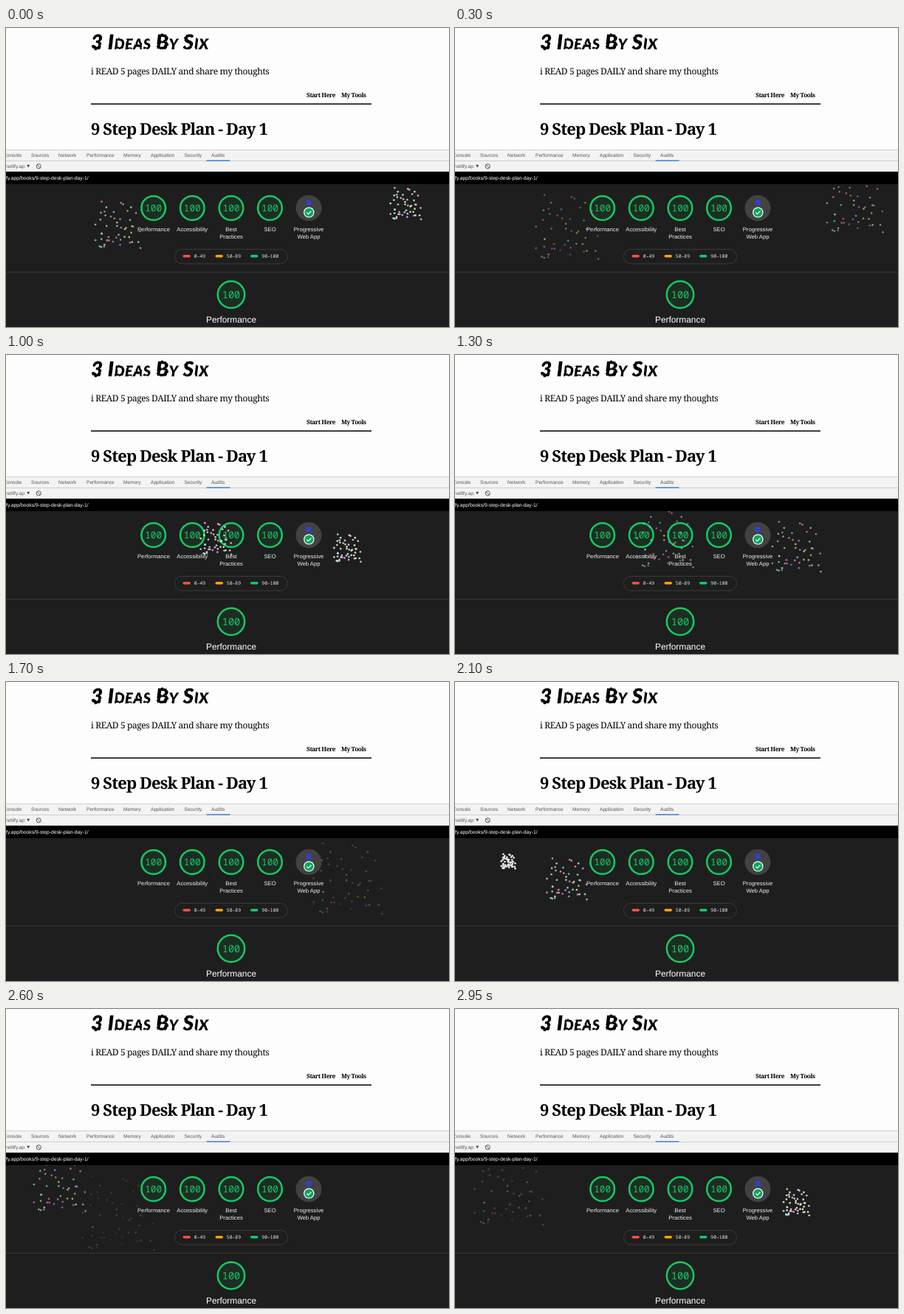
Write an HTML page with a canvas that moves like this. It is 600 by 406 pixels and loops after 3000 ms.

```html
<!DOCTYPE html>
<html lang="en">
<head>
<meta charset="utf-8">
<title>Audit fireworks</title>
<style>
  html, body { margin: 0; width: 600px; height: 406px; overflow: hidden; background: #fdfdfd; }
  svg, canvas { position: absolute; left: 0; top: 0; display: block; }
  canvas { top: 212px; }
  text { text-rendering: geometricPrecision; }
  .ui { font-family: "Liberation Sans", Arial, sans-serif; }
  .slab { font-family: "Noto Serif", serif; fill: #000; }
  .mono { font-family: "Noto Sans Mono", monospace; }
  .marker { font: italic 900 28px Lato, sans-serif; font-variant-caps: small-caps; letter-spacing: .4px; }
  .tab { font-size: 6.6px; fill: #555; }
  .label { font-size: 7.7px; fill: #f0f0f0; text-anchor: middle; }
  .score { fill: #17c964; text-anchor: middle; }
  .ring { fill: #1d2d24; stroke: #17c964; }
  .legend { font-size: 6.4px; fill: #e6e6e6; }
</style>
</head>
<body>
<svg id="page" width="600" height="406" viewBox="0 0 600 406">
  <defs>
    <filter id="rough" x="-5%" y="-20%" width="110%" height="140%">
      <feTurbulence type="fractalNoise" baseFrequency=".12" numOctaves="2" seed="4"/>
      <feDisplacementMap in="SourceGraphic" scale="2.6" xChannelSelector="R" yChannelSelector="G"/>
    </filter>
  </defs>

  <!-- web page -->
  <text class="marker" x="115" y="29" filter="url(#rough)">3 Ideas By Six</text>
  <text class="slab" x="115" y="63" font-size="12" font-weight="500" letter-spacing="-.39">i READ 5 pages DAILY and share my thoughts</text>
  <g class="slab" font-size="8.3" font-weight="700" letter-spacing="-.45">
    <text x="407" y="94">Start Here</text>
    <text x="454" y="94">My Tools</text>
  </g>
  <rect x="115" y="102.4" width="380" height="1.6" fill="#111"/>
  <text class="slab" x="115" y="145" font-size="22" font-weight="700" letter-spacing="-.9">9 Step Desk Plan - Day 1</text>

  <!-- panel bars -->
  <rect y="165" width="600" height="30" fill="#f3f3f3"/>
  <rect y="165" width="600" height="1" fill="#cfcfcf"/>
  <rect y="180" width="600" height="1" fill="#cdcdcd"/>
  <rect x="271.5" y="179.4" width="32" height="1.4" fill="#3b78d8"/>
  <g class="ui">
    <g id="tabs"></g>
    <text class="tab" x="-1" y="190">netlify.ap:</text>
    <path d="M28.2 185.8h4l-2 3.8z" fill="#444"/>
    <g fill="none" stroke="#444" stroke-width=".9">
      <circle cx="44.3" cy="187.8" r="3.1"/>
      <path d="M42.1 185.6l4.4 4.4"/>
    </g>
    <rect y="195" width="600" height="17" fill="#000"/>
    <text x="0" y="206" font-size="6.8" fill="#fff">fy.app/books/9-step-desk-plan-day-1/</text>
  </g>

  <!-- report -->
  <rect y="212" width="600" height="194" fill="#1e1e1e"/>
  <rect y="331" width="600" height="1" fill="#363636"/>
  <g id="gauges"></g>
  <circle cx="410" cy="244.5" r="17.5" fill="#424242"/>
  <rect x="406.5" y="233.5" width="7" height="7" fill="#3040cc"/>
  <circle cx="410.3" cy="250.4" r="7.2" fill="#fff"/>
  <circle cx="410.3" cy="250.4" r="6" fill="#0fa45c"/>
  <path d="M407.3 250.6l2.1 2.1 4-4.1" fill="none" stroke="#fff" stroke-width="1.3"/>
  <g id="labels" class="ui"></g>
  <rect x="228.5" y="300.5" width="153" height="19.5" rx="9.75" fill="none" stroke="#3a3a3a"/>
  <g id="legend"></g>
  <text class="ui" x="305" y="400" font-size="11.9" fill="#fff" text-anchor="middle">Performance</text>
</svg>
<canvas id="sky" width="600" height="194"></canvas>

<script>
const el = id => document.getElementById(id);
const text = (cls, x, y, s, size) =>
  `<text class="${cls}" x="${x}" y="${y}"${size ? ` font-size="${size}"` : ''}>${s}</text>`;

el('tabs').innerHTML = [
  [-3, 'Console'], [34, 'Sources'], [71, 'Network'], [109, 'Performance'], [159, 'Memory'],
  [196, 'Application'], [241.5, 'Security'], [278, 'Audits']
].map(([x, s]) => text('tab', x, 175, s)).join('');

const gauge = (x, y, r, size, base) =>
  `<circle class="ring" cx="${x}" cy="${y}" r="${r}" stroke-width="2.5"/>` +
  text('mono score', x, base, '100', size);
el('gauges').innerHTML =
  [199.7, 252.3, 305, 357.5].map(x => gauge(x, 244.5, 16.3, 12.8, 249)).join('') +
  gauge(305, 362, 18.2, 13.6, 367);

el('labels').innerHTML = [
  [200, 'Performance'], [252.2, 'Accessibility'], [305, 'Best', 'Practices'],
  [357.5, 'SEO'], [410, 'Progressive', 'Web App']
].map(([x, ...lines]) => lines.map((s, i) => text('label', x, 275.5 + i * 10.5, s)).join('')).join('');

el('legend').innerHTML = [
  [239.5, '#ff4e42', '0–49'], [283.5, '#ffa400', '50–89'], [331, '#0cce6b', '90–100']
].map(([x, c, s]) =>
  `<rect x="${x}" y="308" width="10.5" height="3.6" rx="1.8" fill="${c}"/>` +
  text('mono legend', x + 15.3, 312, s)).join('');

// Sparks grouped by hue; each pair is a final offset at double size.
const SPARKS = {
  8: [42, -124, -38, -13, -13, -92, -67, -163, -54, -121],
  25: [36, -52, -72, -87, 97, 33],
  55: [-2, -75, 62, 8, -66, -28, 31, -47, -55, 19, 49, -13],
  95: [58, -32, 57, -139, -93, -66, 30, -14, -2, -60, -75, 26],
  140: [53, -85, 61, -59, -46, -60, -68, -5],
  168: [-70, -116, -47, -139, 88, 8],
  182: [5, -23, -68, 29],
  202: [-51, -105, -16, -119, -67, -28],
  222: [-56, 27, 11, -89],
  252: [-19, 6, 11, 19],
  277: [15, -53, 53, 10],
  300: [24, -152, -93, 0, -44, 1],
  317: [13, -2, 66, -58, 78, -115, 15, -157],
  330: [-28, -100, -36, 1, -5, -11, 95, -38]
};
const SCALE = 0.52, FALL = 40, LOOP = 3000, STEP = 50, TOP = 212;

// Each launcher fires once per period from the next spot in its list.
const LAUNCHERS = [
  { start: -280, period: 1000, spots: [[541, 248], [284, 259], [151, 278], [462, 271]] },
  { start: -550, period: 1250, spots: [[151, 278], [462, 271], [72, 249]] }
];

// cubic-bezier(0, 0, .58, 1), solved by bisection
function easeOut(p) {
  let lo = 0, hi = 1;
  for (let i = 0; i < 24; i++) {
    const s = (lo + hi) / 2;
    if (1.74 * (1 - s) * s * s + s ** 3 < p) lo = s; else hi = s;
  }
  return 3 * (1 - lo) * lo * lo + lo ** 3;
}
const easeIn = p => 1 - easeOut(1 - p);

const ctx = el('sky').getContext('2d');

function burst([x, y], p) {
  const spread = easeOut(p), drop = easeIn(p);
  ctx.globalAlpha = 1 - drop;
  for (const hue in SPARKS) {
    const pts = SPARKS[hue];
    ctx.fillStyle = `hsl(${hue}, 80%, ${100 - 40 * spread}%)`;
    for (let i = 0; i < pts.length; i += 2) {
      ctx.beginPath();
      ctx.arc(x + pts[i] * SCALE * spread,
              y - TOP + pts[i + 1] * SCALE * spread + FALL * drop, 1.35, 0, 2 * Math.PI);
      ctx.fill();
    }
  }
}

function draw(now) {
  const t = Math.floor(now % LOOP / STEP) * STEP;
  ctx.clearRect(0, 0, 600, 194);
  for (const { start, period, spots } of LAUNCHERS) {
    const n = (t - start) / period, shot = Math.floor(n);
    burst(spots[shot], n - shot);
  }
}

const begin = performance.now();
(function tick() {
  draw(performance.now() - begin);
  requestAnimationFrame(tick);
})();
</script>
</body>
</html>
```
